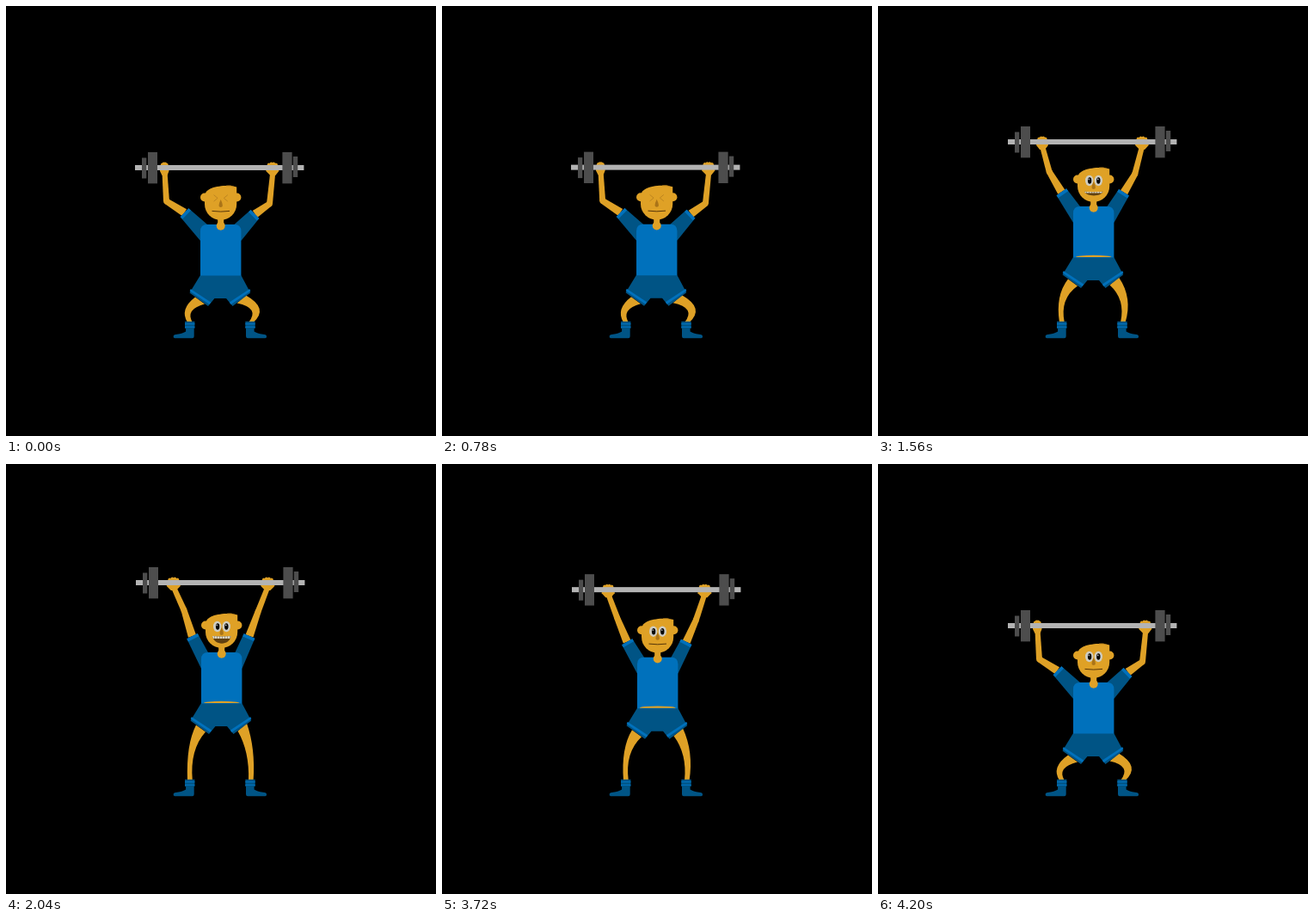
These frames come from a looping animation (500 by 500 pixels, 4.53 s). An HTML page with a canvas:

```html
<!DOCTYPE html>
<html lang="en">
<head>
<meta charset="utf-8">
<title>Weightlifter</title>
<style>
html, body { margin: 0; width: 100%; height: 100%; overflow: hidden; background: #000; }
canvas { display: block; width: 500px; height: 500px; }
</style>
</head>
<body>
<canvas id="stage" width="500" height="500"></canvas>
<script>
const ctx = document.getElementById('stage').getContext('2d');
const LOOP = 4530, STEP = 30;
const SKIN = '#dfa126', BLUE = '#0071bc', NAVY = '#005485';
const STEEL = '#b3b3b3', IRON = '#4d4d4d', TAN = '#aa7418', BROWN = '#553509';

const LIFT = [[0, 188], [420, 192], [600, 191], [1080, 178], [1560, 158], [1620, 155.3], [2040, 138]];
const SWAY = [[0, -1], [270, 7], [420, 5], [540, 2], [750, -1], [1080, 0]];

const clamp = v => Math.max(0, Math.min(1, v));
const mix = (a, b, u) => a + (b - a) * u;

// Smooth curve through points without overshoot.
function track(pts, t) {
  const n = pts.length - 1;
  if (t >= pts[n][0]) return pts[n][1];
  const slope = i => (pts[i + 1][1] - pts[i][1]) / (pts[i + 1][0] - pts[i][0]);
  const tangent = i => {
    if (i === 0 || i === n) return 0;
    const a = slope(i - 1), b = slope(i);
    return a * b <= 0 ? 0 : 2 * a * b / (a + b);
  };
  let i = 0;
  while (t >= pts[i + 1][0]) i++;
  const w = pts[i + 1][0] - pts[i][0], u = (t - pts[i][0]) / w, v = 1 - u;
  return pts[i][1] * (1 + 2 * u) * v * v + tangent(i) * w * u * v * v +
    pts[i + 1][1] * u * u * (3 - 2 * u) - tangent(i + 1) * w * u * u * v;
}

function barHeight(t) {
  if (t < 3300) return track(LIFT, t);
  if (t < 3630) return 138 + 0.3 * clamp((t - 3300) / 180);
  return mix(138.3, 188, clamp((t - 3630) / 570));
}

function rect(x, y, w, h, color) {
  ctx.fillStyle = color;
  ctx.fillRect(x, y, w, h);
}

function poly(pts, color) {
  ctx.beginPath();
  pts.forEach(p => ctx.lineTo(p[0], p[1]));
  ctx.closePath();
  ctx.fillStyle = color;
  ctx.fill();
}

function oval(x, y, rx, ry, color) {
  ctx.beginPath();
  ctx.ellipse(x, y, rx, ry, 0, 0, Math.PI * 2);
  ctx.fillStyle = color;
  ctx.fill();
}

function line(pts, color, width) {
  ctx.beginPath();
  pts.forEach(p => ctx.lineTo(p[0], p[1]));
  ctx.strokeStyle = color;
  ctx.lineWidth = width;
  ctx.stroke();
}

// Two points across the line a-b, at a.
function across(a, b, half) {
  const dx = b[0] - a[0], dy = b[1] - a[1], d = Math.hypot(dx, dy);
  const nx = -dy / d * half, ny = dx / d * half;
  return [[a[0] + nx, a[1] + ny], [a[0] - nx, a[1] - ny]];
}

function limb(a, b, wa, wb) {
  const [p, q] = across(a, b, wa / 2), [r, s] = across(b, a, wb / 2);
  poly([p, q, r, s], SKIN);
}

// Quadratic that passes through k halfway from a to c.
function bend(a, k, c) {
  ctx.quadraticCurveTo(2 * k[0] - (a[0] + c[0]) / 2, 2 * k[1] - (a[1] + c[1]) / 2, c[0], c[1]);
}

function leg(hemOut, kneeOut, ankleOut, ankleIn, kneeIn, hemIn) {
  ctx.beginPath();
  ctx.moveTo(...hemOut);
  bend(hemOut, kneeOut, ankleOut);
  ctx.lineTo(...ankleIn);
  bend(ankleIn, kneeIn, hemIn);
  ctx.closePath();
  ctx.fillStyle = SKIN;
  ctx.fill();
}

function foot(x, dir) {
  ctx.save();
  ctx.translate(x, 0);
  ctx.scale(dir, 1);
  ctx.beginPath();
  ctx.moveTo(-4.6, 374);
  ctx.lineTo(5, 374);
  ctx.lineTo(5, 384);
  ctx.quadraticCurveTo(5, 386.3, 3, 386.3);
  ctx.lineTo(-17.5, 386.3);
  ctx.quadraticCurveTo(-19.5, 386, -19, 383.5);
  ctx.quadraticCurveTo(-18.5, 382, -15, 381.7);
  ctx.quadraticCurveTo(-8, 380.8, -4.6, 378.5);
  ctx.closePath();
  ctx.fillStyle = NAVY;
  ctx.fill();
  rect(-5.7, 366.8, 11.4, 8.2, NAVY);
  rect(-5.7, 369, 11.4, 1.3, BLUE);
  rect(-5.7, 372.6, 11.4, 1.3, BLUE);
  ctx.restore();
}

function legs(hip, dx, k) {
  const c = clamp(k);
  leg([221 + dx, hip + 25], [mix(212.7, 208.5, c), mix(331, 353, c)], [211, 368],
    [216.8, 368], [mix(219, 216, c), mix(336, 355, c)], [232 + dx, hip + 33]);
  leg([280 + dx, hip + 23], [mix(287, 294.6, c), mix(333, 352, c)], [287.6, 368],
    [282, 368], [mix(279.5, 285.5, c), mix(337, 354, c)], [269.5 + dx, hip + 32]);
  foot(213.7, 1);
  foot(284, -1);
}

function shorts(hip) {
  poly([[227, hip - 0.5], [274.3, hip - 0.5], [285.2, hip + 20], [264.5, hip + 35.5],
    [257, hip + 26.5], [243.5, hip + 26.5], [236, hip + 35.5], [214.5, hip + 20]], NAVY);
  for (const s of [-1, 1]) {
    const x = 250 + (s > 0 ? 0.3 : -0.3);
    poly([[x + s * 34, hip + 15.5], [x + s * 35, hip + 18], [x + s * 12.2, hip + 33.5],
      [x + s * 10.5, hip + 31]], BLUE);
  }
}

function arm(hand, elbow, cuff, shoulder, base) {
  limb(elbow, cuff, 7, 9.5);
  limb(hand, elbow, 6, 7);
  oval(elbow[0], elbow[1], 3.4, 3.4, SKIN);
  const [p, q] = across(cuff, shoulder, 7);
  const edge = base[0][0] < 250 ? [q, p] : [p, q];
  poly([edge[0], base[0], base[1], edge[1]], NAVY);
  const d = Math.hypot(shoulder[0] - cuff[0], shoulder[1] - cuff[1]);
  const ux = (shoulder[0] - cuff[0]) / d * 3.6, uy = (shoulder[1] - cuff[1]) / d * 3.6;
  poly([p, q, [q[0] + ux, q[1] + uy], [p[0] + ux, p[1] + uy]], BLUE);
}

function hand(x, bar, left, right) {
  for (let i = 0; i < 4; i++) {
    const u = (i + 0.5) / 4;
    oval(mix(x - left + 2, x + right - 2, u), bar - 3 - (i === 1 || i === 2 ? 0.8 : 0), 2.1, 2.6, SKIN);
  }
  poly([[x - left, bar + 2], [x + right, bar + 2], [x + right, bar + 4],
    [x + 3, bar + 9], [x - 3, bar + 9], [x - left, bar + 4]], SKIN);
}

function shirt(top, hip, gap) {
  ctx.beginPath();
  ctx.moveTo(227, hip);
  ctx.lineTo(227, top + 8);
  ctx.quadraticCurveTo(227, top, 235, top);
  ctx.lineTo(266.4, top);
  ctx.quadraticCurveTo(274.4, top, 274.4, top + 8);
  ctx.lineTo(274.4, hip);
  ctx.closePath();
  ctx.fillStyle = BLUE;
  ctx.fill();
  if (gap > 0) {
    ctx.beginPath();
    ctx.ellipse(250.7, hip - 0.5, 21, 2.4 * gap, 0, Math.PI, Math.PI * 2);
    ctx.fillStyle = SKIN;
    ctx.fill();
  }
}

function mouth(top, open) {
  const y = top - 15;
  ctx.beginPath();
  if (open < 0.05) {
    ctx.moveTo(240.5, y - 0.6);
    ctx.quadraticCurveTo(250.7, y + 0.8, 261, y - 0.6);
    ctx.strokeStyle = BROWN;
    ctx.lineWidth = 1;
    ctx.stroke();
    return;
  }
  const up = y - 4 * open;
  ctx.moveTo(240, up);
  ctx.quadraticCurveTo(250.7, up + 0.8, 261.6, up);
  ctx.bezierCurveTo(260, y + 7.5 * open, 242, y + 7.5 * open, 240, up);
  ctx.closePath();
  ctx.save();
  ctx.fillStyle = '#604010';
  ctx.fill();
  ctx.clip();
  for (let x = 240; x < 262; x += 3) rect(x, up, 2.6, 3 * open, '#d9d5c4');
  ctx.restore();
}

function head(top, awake, open) {
  rect(247.2, top - 8, 7, 10, SKIN);
  oval(250.7, top + 1.8, 5, 5, SKIN);
  oval(232, top - 31.5, 5, 5, SKIN);
  oval(269.4, top - 31.5, 5, 5, SKIN);
  ctx.beginPath();
  ctx.moveTo(232, top - 24);
  ctx.lineTo(232, top - 34);
  ctx.bezierCurveTo(234, top - 43, 247, top - 45, 262, top - 45.2);
  ctx.lineTo(269.2, top - 43.6);
  ctx.lineTo(269.2, top - 24);
  ctx.arc(250.6, top - 23.6, 18.6, 0, Math.PI);
  ctx.closePath();
  ctx.fillStyle = SKIN;
  ctx.fill();
  line([[257, top - 45], [262, top - 44.9], [266, top - 44]], TAN, 0.7);

  ctx.beginPath();
  ctx.moveTo(250.7, top - 29);
  ctx.quadraticCurveTo(255, top - 20, 250.7, top - 20);
  ctx.quadraticCurveTo(246.4, top - 20, 250.7, top - 29);
  ctx.fillStyle = TAN;
  ctx.fill();
  if (awake) {
    for (const x of [245.7, 256.3]) {
      oval(x, top - 30, 4.7, 6.2, '#cfcdc2');
      oval(x + (x < 250 ? 0.4 : 0), top - 30, 2.2, 3.7, '#050505');
      oval(x - 0.5, top - 31.6, 0.7, 0.9, '#d8d8d8');
    }
  } else {
    for (const s of [-1, 1]) {
      const x = 250.7 + s * 3.6;
      line([[x + s * 4.5, top - 34.3], [x, top - 30.6], [x + s * 4.5, top - 26.8]], '#b98220', 0.9);
    }
  }
  mouth(top, open);
}

function barbell(y) {
  rect(151, y - 3, 196.4, 6, STEEL);
  rect(159, y - 11.5, 5.3, 24, IRON);
  rect(166, y - 18, 11, 36.4, IRON);
  rect(322.4, y - 18, 11.2, 36.4, IRON);
  rect(334.8, y - 13, 5.4, 24, IRON);
}

function draw(t) {
  const bar = barHeight(t), dx = t < 4200 && t >= 1080 ? 0 : t < 1080 ? track(SWAY, t) : 0;
  const k = (bar - 138) / 50;
  const top = 219 + 0.7 * (bar - 138), hip = top + 59.6;
  const awake = t >= 1350;
  const open = t < 3300 ? clamp(t < 1560 ? (t - 1300) / 480 : mix(0.54, 1, (t - 1560) / 480))
    : 1 - clamp((t - 3300) / 180);

  rect(0, 0, 500, 500, '#000');
  legs(hip, dx, k);
  ctx.save();
  ctx.translate(dx, 0);
  shorts(hip);

  const lx = 194.8 - 9.3 * k, rx = 304.3 + 7 * k;
  arm([lx, bar + 5], [207 - 19.5 * k, bar + 32 + 7 * k], [216.5 - 8 * k, top - 18.8 + 5 * k],
    [229, top + 6], [[235, top], [227, top + 19]]);
  arm([rx, bar + 5], [293 + 14.5 * k, bar + 34 + 8 * k], [283 + 7.5 * k, top - 19 + 7 * k],
    [272, top + 6], [[266.4, top], [274.4, top + 19]]);
  shirt(top, hip, clamp((0.75 - k) / 0.35));
  head(top, awake, open);
  hand(lx, bar, mix(8, 5.5, clamp(k)), mix(8, 5, clamp(k)));
  hand(rx, bar, 8, mix(8, 7, clamp(k)));
  barbell(bar);
  ctx.restore();
}

const start = performance.now();
function tick() {
  const t = (performance.now() - start) % LOOP;
  draw(Math.floor(t / STEP) * STEP);
  requestAnimationFrame(tick);
}
tick();
</script>
</body>
</html>
```
